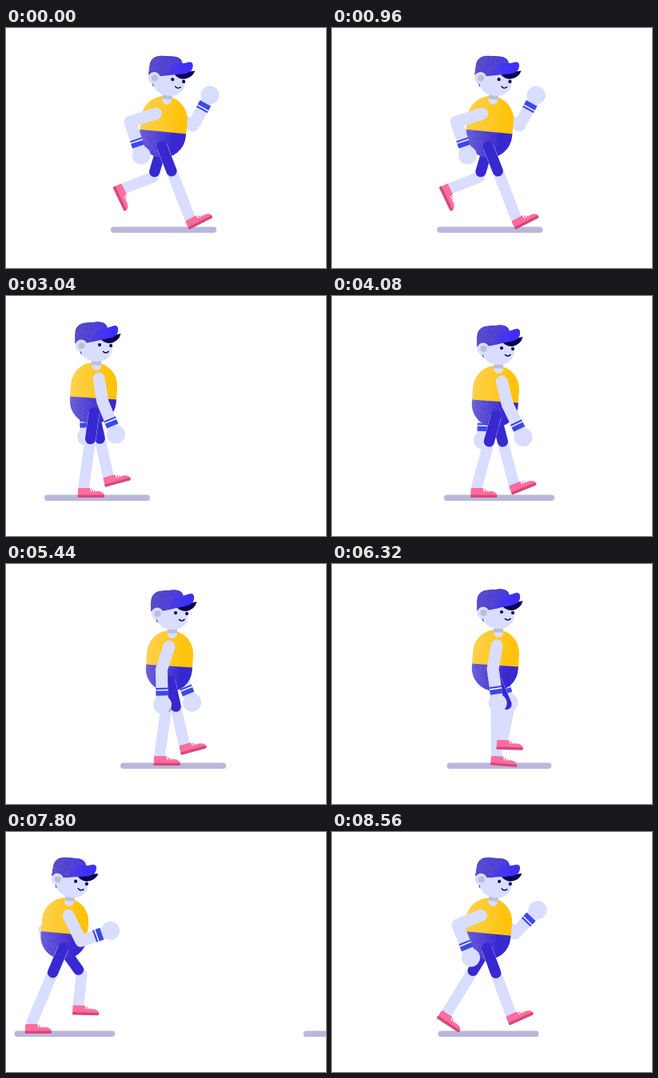
These frames come from a looping animation (400x300 px, 8.6 s). An HTML page with a canvas:

```html
<!DOCTYPE html>
<html lang="en">
<head>
<meta charset="utf-8">
<title>Run and walk</title>
<style>
html, body { margin: 0; width: 100%; height: 100%; overflow: hidden; background: #fff; }
canvas { display: block; width: 400px; height: 300px; }
</style>
</head>
<body>
<canvas id="stage"></canvas>
<script>
const canvas = document.getElementById('stage');
const ctx = canvas.getContext('2d');
const dpr = window.devicePixelRatio || 1;
canvas.width = 400 * dpr;
canvas.height = 300 * dpr;

const LOOP = 8600, RUN = 480, WALK = 960, GROUND = 249;
const BONE = 40, SHORTS = 33;
const SKIN = '#d9ddff', BLUE = '#3828d0', BAND = '#3d49ea', NAVY = '#0b0050';
const PINK = '#ff6d9f', SOLE = '#d5497a', GREY = '#bdbfd6', SHADOW = '#b9b8da';

// Two harmonics of the stride angle
const wave = (a, mean, c1, s1, c2 = 0, s2 = 0) => mean + c1 * Math.cos(a) + s1 * Math.sin(a)
  + c2 * Math.cos(2 * a) + s2 * Math.sin(2 * a);

function ease(t, from, to) {
  const u = Math.min(1, Math.max(0, (t - from) / (to - from)));
  return (1 - Math.cos(Math.PI * u)) / 2;
}

function at(x, y, angle, draw) {
  ctx.save();
  ctx.translate(x, y);
  ctx.rotate(angle * Math.PI / 180);
  draw();
  ctx.restore();
}

function line(points, width, color, cap = 'round') {
  ctx.beginPath();
  points.forEach(p => ctx.lineTo(p[0], p[1]));
  ctx.lineWidth = width;
  ctx.lineCap = cap;
  ctx.lineJoin = 'round';
  ctx.strokeStyle = color;
  ctx.stroke();
}

function disc(x, y, r, color) {
  ctx.beginPath();
  ctx.arc(x, y, r, 0, 7);
  ctx.fillStyle = color;
  ctx.fill();
}

function shape(d, color) {
  ctx.fillStyle = color;
  ctx.fill(new Path2D(d));
}

function fade(x0, x1, a, b) {
  const g = ctx.createLinearGradient(x0, 0, x1, 0);
  g.addColorStop(0, a);
  g.addColorStop(1, b);
  return g;
}

// Point at a distance from p towards q
function toward(p, q, d) {
  const k = d / Math.hypot(q[0] - p[0], q[1] - p[1]);
  return [p[0] + (q[0] - p[0]) * k, p[1] + (q[1] - p[1]) * k];
}

// Grain thins out from left to right
let seed = 7;
const rnd = () => (seed = seed * 16807 % 2147483647) / 2147483647;
const specks = Array.from({ length: 330 }, () => [rnd() ** 1.8, rnd()]);

function grain(x, y, w, h, color) {
  ctx.fillStyle = color;
  specks.forEach(([u, v]) => ctx.fillRect(x + u * w, y + v * h, 0.8, 0.8));
}

function shoe() {
  shape('M-7 1V-7Q-7-9-5-9H9Q13-5 19-5Q26-4 26 1Z', PINK);
  shape('M-7-.5H26Q27 3 24 3H-6Q-8 3-7-.5Z', SOLE);
  for (let x = 9; x < 16; x += 2.8) line([[x, -9], [x + 0.8, -5]], 1.3, '#fff');
}

// The knee bends forward when the foot is near and the leg stretches when it is far
function leg(hip, foot) {
  const press = Math.max(0, foot.y - GROUND);
  const y = foot.y - press, angle = foot.angle * Math.max(0, 1 - press / 5);
  const r = angle * Math.PI / 180;
  const ankle = [foot.x + 8 * Math.sin(r), y - 8 * Math.cos(r)];
  const dx = ankle[0] - hip[0], dy = ankle[1] - hip[1], len = Math.hypot(dx, dy);
  const bend = Math.sqrt(Math.max(0, BONE ** 2 - len ** 2 / 4)) / len;
  const knee = [hip[0] + dx / 2 + dy * bend, hip[1] + dy / 2 - dx * bend];
  line([hip, knee, ankle], 13.8, SKIN, 'butt');
  line([hip, toward(hip, knee, SHORTS)], 13.2, BLUE);
  at(foot.x, y, angle, shoe);
}

function arm(shoulder, elbow, hand) {
  line([shoulder, elbow, hand], 15, SKIN);
  disc(...hand, 11.5, SKIN);
  const strip = (from, to, color) =>
    line([toward(hand, elbow, from), toward(hand, elbow, to)], 15.5, color, 'butt');
  strip(11.5, 21.2, BAND);
  strip(17.6, 19, '#fff');
}

function body() {
  ctx.beginPath();
  ctx.roundRect(-29, -38.5, 58, 77, 29);
  ctx.clip();
  ctx.fillStyle = fade(-29, 20, '#ffd049', '#ffc30a');
  ctx.fillRect(-30, -39, 60, 46);
  grain(-29, -38, 40, 43, 'rgba(255,228,150,.3)');
  ctx.fillStyle = fade(-29, 14, '#6a5dd6', BLUE);
  ctx.fillRect(-30, 6, 60, 34);
  grain(-29, 6, 38, 33, 'rgba(150,140,235,.35)');
}

function head() {
  line([[0, -4], [0, 3]], 12, SKIN);
  line([[-6, 0], [6, 0]], 5, GREY, 'butt');
  shape('M-22-18L-19-11L-15-14Z', NAVY);
  shape('M-21-30H20V-20C20-8 11-2 0-2C-12-2-21-10-21-22Z', SKIN);
  shape('M5-31L30.5-37Q28-27 17-25Q10-25 5-30Z', NAVY);
  ctx.save();
  const dome = new Path2D('M-27-25V-36C-27-47-20-51-10-51L2-52C10-52 14-48 14-43V-31L-3-27Q-14-24-27-25Z');
  ctx.clip(dome);
  ctx.fillStyle = fade(-27, 14, '#5649ca', '#4638da');
  ctx.fill(dome);
  grain(-27, -52, 44, 28, 'rgba(130,120,225,.4)');
  ctx.restore();
  shape('M-5-27C-3-40 4-44 12-44Q17-45 22-47C28-48 28-41 26-37Q23-32 12-30.5Q4-30-5-27Z',
    fade(-5, 18, '#4a3de0', '#3f2ffb'));
  disc(-19, -22, 7.5, SKIN);
  disc(-18.5, -22, 4, GREY);
  disc(4, -23, 2.1, NAVY);
  disc(18, -22, 2.1, NAVY);
  ctx.beginPath();
  ctx.moveTo(8, -15);
  ctx.quadraticCurveTo(11.5, -11, 15.5, -15);
  ctx.lineWidth = 1.4;
  ctx.strokeStyle = NAVY;
  ctx.stroke();
}

function shadow(width) {
  ctx.beginPath();
  ctx.roundRect(-width / 2, 248.5, width, 7.5, 3.75);
  ctx.fillStyle = SHADOW;
  ctx.fill();
}

const runFoot = a => ({
  x: wave(a, -10.5, 47.5, -6.2, 0, 2.6),
  y: wave(a, 235, 20.5, 34.5, -9.6, -6),
  angle: wave(a, 20, -45.5, -22, -1.6, 17)
});

const walkFoot = a => ({
  x: wave(a, -3, 16.5, 21.5, 2.5, -2),
  y: wave(a, 244.5, -9, 6, -1.5, 4.7),
  angle: wave(a, 0.75, -7.5, -9, -8.25, -8.8)
});

function runner(t) {
  const a = 2 * Math.PI * t / RUN, y = 3.1 * Math.sin(2 * a);
  const hip = [-2, 148 + y];
  const swing = a => {
    const elbow = [wave(a, -2.5, -39.5, 3), wave(a, 127.5, -2.5, 6.6, -8, 2.3)];
    const hand = [wave(a, 23, -43, 8.6, -8, -1.2), wave(a, 131.5, 37.5, 6, -10, -1.2)];
    arm([elbow[0] * 0.23, 107 + y], elbow, hand);
  };
  shadow(132 + 2.3 * y);
  swing(a + Math.PI);
  leg(hip, runFoot(a + Math.PI));
  at(-0.2, 123.5 + y, 5.5, body);
  leg(hip, runFoot(a));
  at(4.6 - y * 0.6, 86.5 + y, 7 - y * 0.7, head);
  swing(a);
}

function walker(t) {
  const a = 2 * Math.PI * t / WALK, y = wave(2 * a, 1, 0, 2.9, -1);
  const hip = [-4, 146 + y];
  const swing = a => {
    const c = Math.cos(a - Math.PI / 4);
    arm([-1.5 + 5 * c, 103 + y], [-4 + 15 * c, 132 + y], [5 + 26 * c, 174.5 - 2 * c + y]);
  };
  shadow(132 + 1.5 * y);
  swing(a + Math.PI);
  leg(hip, walkFoot(a));
  at(-4.6, 121.5 + y, 4, body);
  leg(hip, walkFoot(a + Math.PI));
  at(-1, 84 + y, 0, head);
  swing(a);
}

function frame() {
  const t = performance.now() % LOOP;
  ctx.setTransform(dpr, 0, 0, dpr, 0, 0);
  ctx.fillStyle = '#fff';
  ctx.fillRect(0, 0, 400, 300);
  const early = t < 5000;
  const runX = early ? 380 * ease(t, 900, 4100) : 360 * (ease(t, 6520, 8650) - 1);
  const walkX = 360 * (ease(t, 1557, 3817) - 1) + 345 * ease(t, 6520, 8640);
  at(197 + runX, 0, 0, () => runner(early ? t : t - LOOP));
  at(209 + walkX, 0, 0, () => walker(t + 800));
  requestAnimationFrame(frame);
}
frame();
</script>
</body>
</html>
```
